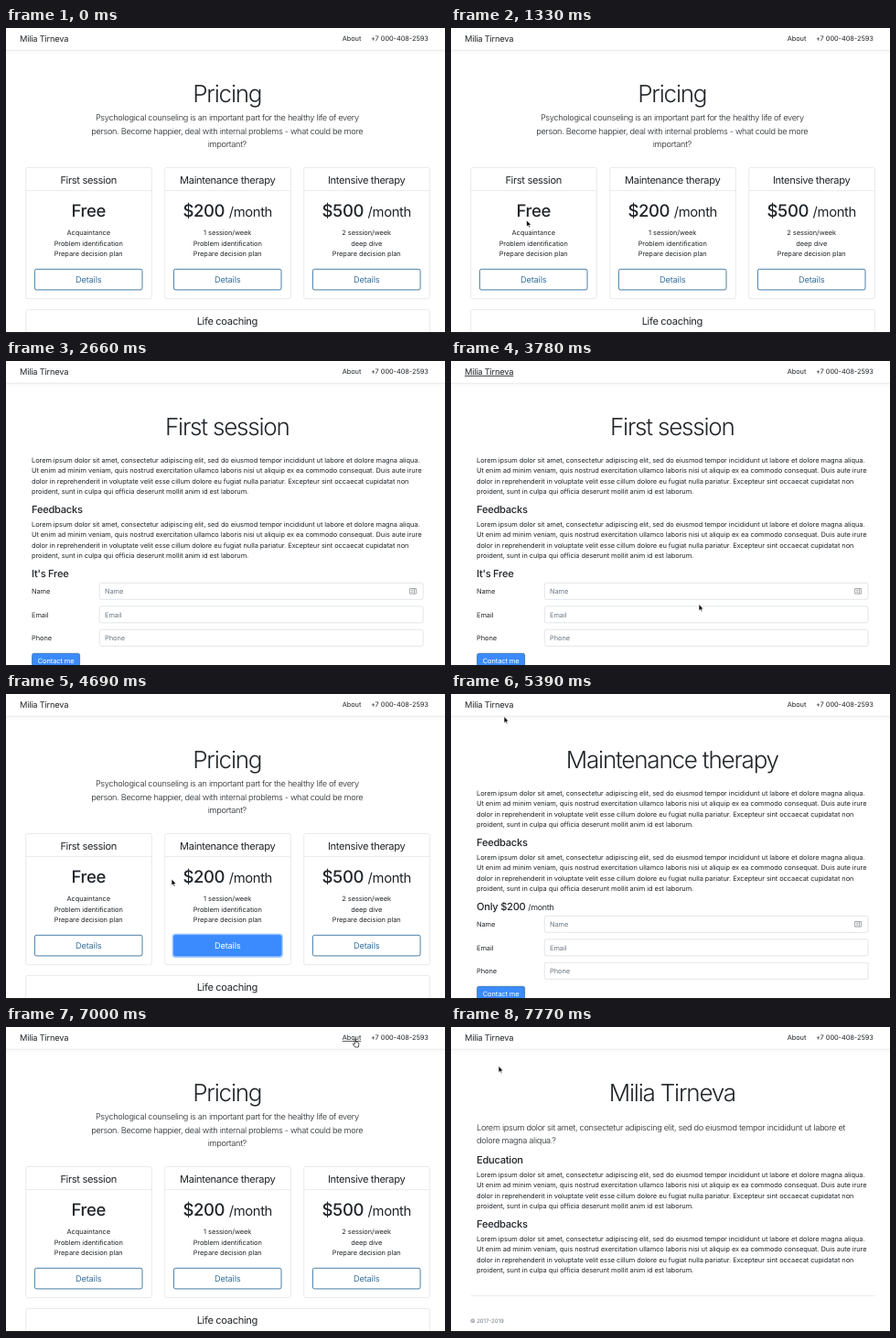
An HTML page that plays this animation: 480x333 px, repeating every 8000 ms.

```html
<!DOCTYPE html>
<html lang="en">
<head>
<meta charset="utf-8">
<title>Pricing</title>
<style>
html, body { margin: 0; width: 100%; height: 100%; overflow: hidden; background: #fff; }
svg { display: block; width: 480px; height: 333px; }
text { font-family: Inter, "Open Sans", sans-serif; fill: #212529; text-rendering: geometricPrecision; white-space: pre; }
.body { font-size: 7.4px; letter-spacing: -.0065em; }
.lead { font-size: 9.2px; font-weight: 350; letter-spacing: -.033em; }
.title { font-size: 26px; font-weight: 300; letter-spacing: -.046em; }
.head { font-size: 11.1px; letter-spacing: -.03em; }
.sub { font-size: 11.1px; font-weight: 500; letter-spacing: -.022em; }
.price { font-size: 18.5px; font-weight: 500; letter-spacing: -.02em; }
.small { font-size: 80%; font-weight: 400; }
.label, .brand { font-size: 9.25px; letter-spacing: -.02em; }
.foot { font-size: 6px; fill: #6c757d; }
.hint { fill: #6c757d; }
.mid { text-anchor: middle; }
.box { fill: #fff; stroke: #e3e4e6; stroke-width: .8; }
.button .face { fill: #fff; stroke: #36709c; stroke-width: .9; }
.button .ring { fill: none; }
.button text { fill: #36709c; }
.button.hot .face { fill: #3b8bff; stroke: #3b8bff; }
.button.hot text { fill: #fff; }
.button.clicked .ring { fill: #a9cfff; }
text.hot { text-decoration: underline; }
</style>
</head>
<body>
<svg id="stage" viewBox="0 0 480 333"></svg>
<script>
const LOOP = 8000, STEP = 70, MID = 241.8;
const NAME = "Milia Tirneva";
const LOREM = [
  "Lorem ipsum dolor sit amet, consectetur adipiscing elit, sed do eiusmod tempor incididunt ut labore et dolore magna aliqua.",
  "Ut enim ad minim veniam, quis nostrud exercitation ullamco laboris nisi ut aliquip ex ea commodo consequat. Duis aute irure",
  "dolor in reprehenderit in voluptate velit esse cillum dolore eu fugiat nulla pariatur. Excepteur sint occaecat cupidatat non",
  "proident, sunt in culpa qui officia deserunt mollit anim id est laborum."
];

const text = (x, y, cls, s, extra = "") => `<text x="${x}" y="${y}" class="${cls}" ${extra}>${s}</text>`;
const rect = (x, y, w, h, extra) => `<rect x="${x}" y="${y}" width="${w}" height="${h}" ${extra}/>`;
const lines = (x, y, gap, cls, list) => list.map((s, i) => text(x, y + i * gap, cls, s)).join("");
const title = s => text(MID, 81, "title mid", s);
const lorem = y => lines(28, y, 11.5, "body", LOREM);
const cost = n => `$${n} <tspan class="small">/month</tspan>`;
const cardX = i => 21.7 + 152 * i;

function card(i, name, price, items) {
  const x = cardX(i), c = x + 68.5;
  return rect(x, 152.4, 137.6, 143.2, 'rx="2" class="box"') +
    rect(x, 177.3, 137.6, .8, 'fill="#e3e4e6"') +
    text(c, 169.5, "head mid", name) +
    text(c, 206, "price mid", price) +
    lines(c, 226.2, 11.4, "body mid", items) +
    `<g id="plan${i}" class="button">` +
    rect(x + 7.8, 261.4, 121.4, 26.6, 'rx="3.5" class="ring"') +
    rect(x + 9.7, 263.3, 117.6, 22.6, 'rx="2" class="face"') +
    text(c, 277.6, "label mid", "Details") + "</g>";
}

const field = (label, i) => {
  const y = 242.3 + 25.5 * i;
  return text(28, y + 12, "body", label) +
    rect(102.3, y, 353.8, 18, 'rx="2" fill="#fff" stroke="#d6dade" stroke-width=".7"') +
    text(108, y + 12, "body hint", label);
};

const session = (name, price) => title(name) + lorem(110.5) +
  text(28, 165.8, "sub", "Feedbacks") + lorem(180.5) + text(28, 236, "sub", price) +
  ["Name", "Email", "Phone"].map(field).join("") +
  `<path class="icon" fill="none" stroke="#8b8f94" stroke-width=".8" d="M441.6 248.5h6.8v5.6h-6.8zM443 250.3h2.2M443 252.2h2.2M446.4 249v4.6"/>` +
  rect(28.6, 319.3, 52, 19, 'rx="2" fill="#3b8bff" stroke="#36709c" stroke-width=".8"') +
  text(54.6, 330, "body mid", "Contact me", 'style="fill:#fff"');

const pages = {
  pricing: title("Pricing") +
    lines(MID, 101.3, 14.3, "lead mid", [
      "Psychological counseling is an important part for the healthy life of every",
      "person. Become happier, deal with internal problems - what could be more",
      "important?"]) +
    card(0, "First session", "Free", ["Acquaintance", "Problem identification", "Prepare decision plan"]) +
    card(1, "Maintenance therapy", cost(200), ["1 session/week", "Problem identification", "Prepare decision plan"]) +
    card(2, "Intensive therapy", cost(500), ["2 session/week", "deep dive", "Prepare decision plan"]) +
    rect(21.7, 307.4, 441.6, 40, 'rx="2" class="box"') +
    text(MID, 324.3, "head mid", "Life coaching"),
  first: session("First session", "It's Free"),
  care: session("Maintenance therapy", "Only " + cost(200)),
  about: title(NAME) +
    lines(28, 112.6, 14.3, "lead", [
      "Lorem ipsum dolor sit amet, consectetur adipiscing elit, sed do eiusmod tempor incididunt ut labore et",
      "dolore magna aliqua.?"]) +
    text(28, 149, "sub", "Education") + lorem(163.7) +
    text(28, 219, "sub", "Feedbacks") + lorem(233.7) +
    rect(21.5, 293, 442, .7, 'fill="#e3e5e7"') +
    text(21, 323.2, "foot", "© 2017-2019")
};

const nav = rect(0, 24, 480, 6, 'fill="url(#shade)"') + rect(0, 23.8, 480, .7, 'fill="#e1e4e7"') +
  text(15, 14.8, "brand", NAME, 'id="brand"') +
  text(367.7, 14.3, "body", "About", 'id="about"') +
  text(461.8, 14.3, "body", "+7 000-408-2593", 'text-anchor="end"');

document.getElementById("stage").innerHTML =
  `<defs><linearGradient id="shade" x2="0" y2="1"><stop stop-opacity=".03"/><stop offset="1" stop-opacity="0"/></linearGradient></defs>` +
  Object.entries(pages).map(([id, s]) => `<g id="${id}Page">${s}</g>`).join("") +
  `<g id="nav">${nav}</g>` + rect(0, 332, 480, 1, 'fill="#111"') +
  `<g id="cursor" stroke="#fff" stroke-width=".7">
    <path id="arrow" d="M0 0V7.2L1.7 5.7L2.8 8.3L4 7.8L2.9 5.3H5.1Z"/>
    <path id="hand" d="M1.2 .6C1.2-.3 2.5-.3 2.5 .6V3.5L5 4Q6 4.2 5.9 5.3L5.3 9H1.8L-.5 6C-.9 5.2 0 4.8 .5 5.3L1.2 6Z" fill="#fff" stroke="#111"/>
  </g>`;

// Hover areas: x, y, width, height
const links = { brand: [15, 4, 52, 14], about: [366, 4, 23, 16] };
for (const i of [0, 1, 2]) links["plan" + i] = [cardX(i) + 9.7, 263.3, 117.6, 22.6];

// The brand link reloads the whole page, which goes blank for one step
const visits = [
  { click: 0, load: 0, page: "pricing" },
  { click: 1890, load: 2310, page: "first", link: "plan0" },
  { click: 3430, load: 3920, page: "pricing", link: "brand" },
  { click: 4550, load: 4830, page: "care", link: "plan1" },
  { click: 5670, load: 6300, page: "pricing", link: "brand" },
  { click: 7000, load: 7350, page: "about", link: "about" }
];

// Each move: start, end, x, y
const strokes = [
  { from: 70, to: 2520, at: [194, 188], moves: [
    [280, 350, 446, 262], [350, 420, 77, 161], [980, 1750, 90, 274], [2240, 2520, 70, 70]] },
  { from: 2870, to: 4830, at: [55, 5], moves: [
    [2870, 3360, 35, 10], [3430, 3570, 428, 165], [3640, 3780, 271, 265.5],
    [3850, 4480, 250, 275], [4550, 4690, 181, 202]] },
  { from: 5110, to: LOOP, at: [120, 90], moves: [
    [5110, 5390, 58, 24.5], [5390, 5600, 48, 9], [5670, 5740, 66, 19],
    [5880, 6230, 371.5, 33.5], [6230, 7000, 380, 13], [7280, 7770, 52, 42.5]] }
];

const $ = id => document.getElementById(id);
const show = (el, on) => el.style.display = on ? "" : "none";
const smooth = k => k * k * (3 - 2 * k);

function cursorAt(t) {
  const stroke = strokes.find(s => t >= s.from && t < s.to);
  return stroke && stroke.moves.reduce(([px, py], [start, end, x, y]) => {
    const k = smooth(Math.max(0, Math.min(1, (t - start) / (end - start))));
    return [px + (x - px) * k, py + (y - py) * k];
  }, stroke.at);
}

function draw(now) {
  const t = Math.floor(now % LOOP / STEP) * STEP;
  const visit = visits.findLast(v => v.load <= t);
  const pending = visits.find(v => v.click <= t && t < v.load);
  const blank = pending?.link === "brand" && t >= pending.load - STEP;
  for (const id in pages) show($(id + "Page"), !blank && id === visit.page);
  show($("nav"), !blank);
  document.querySelectorAll(".icon").forEach(el => show(el, t >= visit.load + 350));

  const at = cursorAt(t);
  let hand = false;
  for (const [id, [x, y, w, h]] of Object.entries(links)) {
    const present = !blank && (visit.page === "pricing" || !id.startsWith("plan"));
    const over = present && at && at[0] >= x && at[0] <= x + w && at[1] >= y && at[1] <= y + h;
    const clicked = pending?.link === id;
    $(id).classList.toggle("hot", Boolean(over || clicked));
    $(id).classList.toggle("clicked", clicked);
    hand ||= over;
  }

  show($("cursor"), at);
  if (at) $("cursor").setAttribute("transform", `translate(${at})`);
  show($("hand"), hand);
  show($("arrow"), !hand);
}

const start = performance.now();
function tick() {
  draw(performance.now() - start);
  requestAnimationFrame(tick);
}
tick();
</script>
</body>
</html>
```
